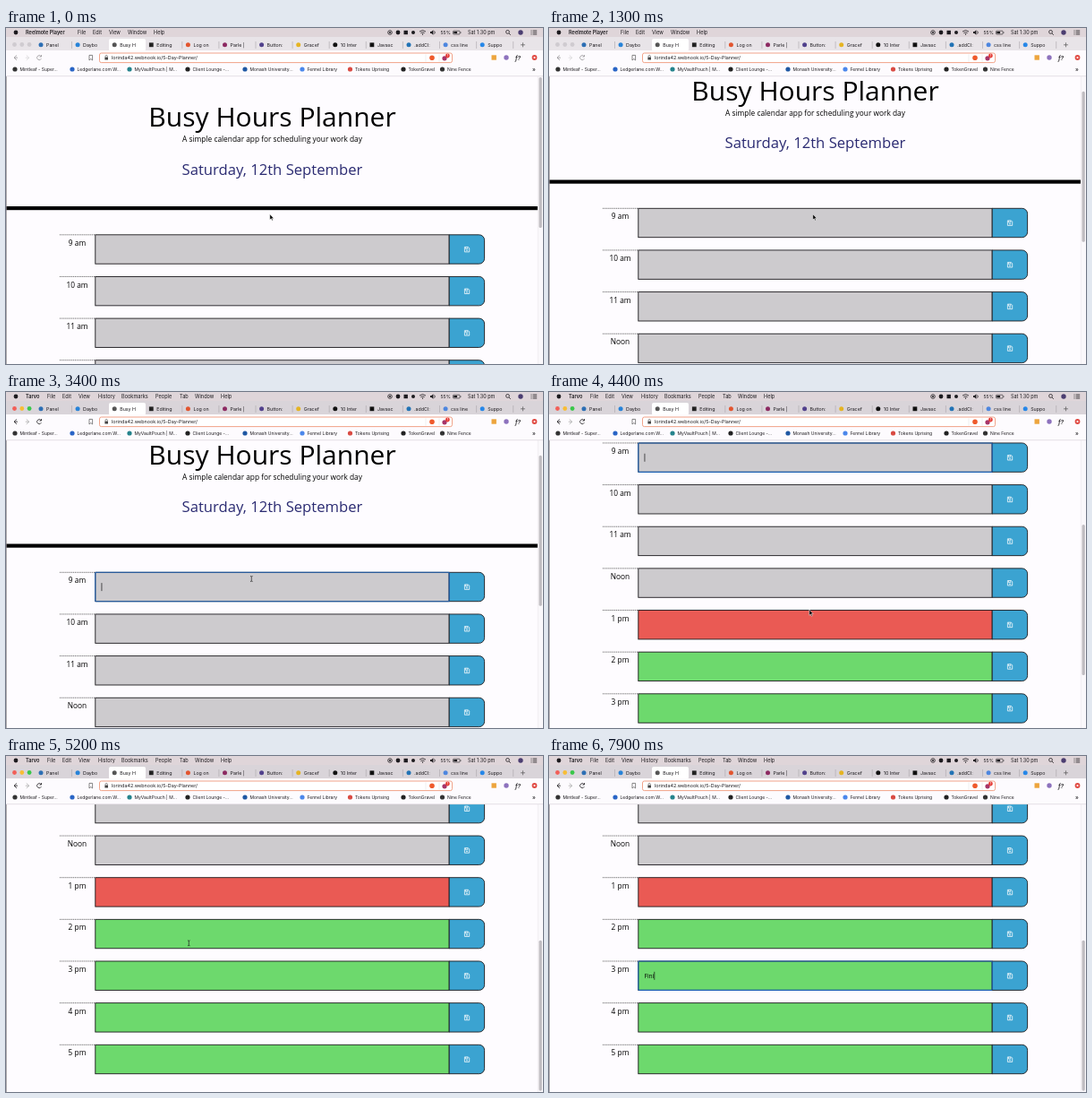
Recreate the animation shown at these times as an HTML page. Size 600x375 px, loop 8 s.

```html
<!DOCTYPE html>
<html lang="en">
<head>
<meta charset="utf-8">
<title>Day planner</title>
<style>
  html, body { margin: 0; height: 100%; overflow: hidden; background: #fefcff; }
  svg { display: block; width: 600px; height: 375px; }
  text { font-family: Inter, "Liberation Sans", sans-serif; white-space: pre; }
  #page text { font-family: "Open Sans", "Noto Sans", sans-serif; }
</style>
</head>
<body>
<svg id="stage" viewBox="0 0 600 375"></svg>
<script>
const LOOP = 8000, STEP = 100;
const ROW_TOP = 230.6, ROW_GAP = 46.65;
const FIRST_CLICK = 2400, SECOND_CLICK = 6000;
const INK = '#1c1a1e';

const rect = (x, y, w, h, fill, extra = '') =>
  `<rect x="${x}" y="${y}" width="${w}" height="${h}" fill="${fill}" ${extra}/>`;
const dot = (x, y, r, fill, extra = '') =>
  `<circle cx="${x}" cy="${y}" r="${r}" fill="${fill}" ${extra}/>`;
const line = (d, color = INK, width = 0.8, extra = '') =>
  `<path d="${d}" fill="none" stroke="${color}" stroke-width="${width}" ${extra}/>`;
const text = (x, y, size, str, fill = INK, extra = '') =>
  `<text x="${x}" y="${y}" font-size="${size}" fill="${fill}" ${extra}>${str}</text>`;
const centered = (x, y, size, str, fill) => text(x, y, size, str, fill, 'text-anchor="middle"');
const group = (id, body) => `<g id="${id}">${body}</g>`;
const rowY = i => ROW_TOP + i * ROW_GAP;

function hourRow(label, i) {
  const fill = i < 4 ? '#cdcbce' : i === 4 ? '#ea5a54' : '#6dd96d';
  return `<g transform="translate(0 ${rowY(i)})">` +
    line('M60 .2H99', '#444', 0.8, 'stroke-dasharray="1.2 .9"') +
    centered(79.5, 12.3, 8.33, label, '#000') +
    rect(99.8, 0.2, 395.4, 32.4, fill, `stroke="${INK}" stroke-width=".9"`) +
    `<path d="M495.2 .2H528.6a6 6 0 0 1 6 6V26.6a6 6 0 0 1-6 6H495.2Z" fill="#3ba3d1" stroke="${INK}" stroke-width=".9"/>` +
    line('M512.4 13.8h4l1.3 1.3v4.2h-5.3zM513.6 14v1.9h2.2v-1.9', '#fff', 0.75) +
    dot(515, 17.7, 0.8, '#fff') + '</g>';
}

function page() {
  const hours = ['9 am', '10 am', '11 am', 'Noon', '1 pm', '2 pm', '3 pm', '4 pm', '5 pm'];
  return centered(297.5, 110, 30, 'Busy Hours Planner', '#000') +
    centered(297.5, 127.3, 8.33, 'A simple calendar app for scheduling your work day', '#000') +
    centered(297.5, 163.6, 16.67, 'Saturday, 12th September', '#2b2b72') +
    rect(0, 199, 594, 4.2, '#000') +
    hours.map(hourRow).join('') +
    group('focus',
      rect(99.8, 0.2, 395.4, 32.4, 'none', 'rx=".8" stroke="#1f62b4" stroke-width="1.1"') +
      text(106.5, 19, 6.67, '', '#000', 'id="typed"') +
      rect(106.6, 12, 0.7, 9, '#111', 'id="caret"'));
}

const menu = items => items.map(([x, str], i) =>
  text(x, 7, 5.6, str, INK, i ? '' : 'font-weight="600"')).join('');

function menuBar() {
  return rect(0, 0, 600, 10, '#dfd5d9') + dot(11, 5, 2.4, INK) +
    group('idleMenu', menu([[22, 'Reelmote Player'], [80, 'File'], [97, 'Edit'], [115, 'View'],
      [136, 'Window'], [165, 'Help']])) +
    group('liveMenu', menu([[22, 'Tarvo'], [46, 'File'], [63, 'Edit'], [81, 'View'], [103, 'History'],
      [129, 'Bookmarks'], [167, 'People'], [194, 'Tab'], [211, 'Window'], [240, 'Help']])) +
    dot(429, 5, 2.3, 'none', `stroke="${INK}" stroke-width=".8"`) + dot(429, 5, 1, INK) +
    dot(438, 5, 2.4, INK) + rect(444.5, 2.8, 4.4, 4.4, INK) +
    dot(455, 5, 2, INK) +
    line('M462 4q3.5-2.8 7 0M463.4 5.6q2.1-1.6 4.2 0') + dot(465.5, 7, 0.7, INK) +
    `<path d="M474 4h1.4l2-1.7v5.4l-2-1.7H474Z" fill="${INK}"/>` + line('M478.6 3.4q1.4 1.6 0 3.2') +
    text(485.5, 7, 5.2, '55%') +
    rect(499.5, 3.2, 7.6, 3.8, 'none', `rx=".8" stroke="${INK}" stroke-width=".6"`) +
    rect(500.3, 4, 3.8, 2.2, INK) + rect(507.7, 4.3, 0.6, 1.6, INK) +
    text(516, 7, 5.5, 'Sat 1:30 pm') +
    dot(560.5, 4.4, 1.9, 'none', `stroke="${INK}" stroke-width=".8"`) + line('M562 6l1.8 1.8') +
    dot(575, 5, 2.7, '#4b3d70') +
    line('M586.5 3h1M588.6 3h4.6M586.5 5h1M588.6 5h4.6M586.5 7h1M588.6 7h4.6');
}

function tabBar() {
  const tabs = [['Panel', '#2d6fb4'], ['Daybo', '#2783d8'], ['Busy H', '#555'], ['Editing', '#222'],
    ['Log on', '#e2552f'], ['Parle |', '#8c2961'], ['Button:', '#51418c'], ['Gracef', '#e5b423'],
    ['10 Inter', '#111'], ['Javasc', '#111'], ['.addCl:', '#2273b5'], ['css line', '#4d86df'],
    ['Suppo', '#2687e8']];
  return rect(0, 10, 600, 15.5, '#d9d4d9', 'id="strip"') +
    ['#f25f58', '#f8bd35', '#3ac74b'].map((c, i) => dot(9.5 + i * 8.3, 18.5, 2.4, c, 'class="light"')).join('') +
    rect(115, 12, 41, 14, '#fff', 'rx="2"') +
    tabs.map(([name, color], i) => {
      const x = 39 + i * 41.1;
      const mark = i === 3 || i === 9 ? rect(x - 2.4, 16.4, 4.8, 4.8, color) : dot(x, 18.8, 2.5, color);
      const edge = i === 1 || i === 2 ? '' : line(`M${x + 34.5} 15v8`, '#aaa4aa', 0.6);
      return mark + text(x + 6, 20.8, 5.3, name) + edge;
    }).join('') +
    line('M575 18.8h5M577.5 16.3v5', '#555', 0.7);
}

function toolBar() {
  return rect(0, 25, 600, 29, '#fdfbfe') +
    group('tools', line('M12 30.5l-3 2.7 3 2.7M9 33.2h4') +
      line('M22.8 30.5l3 2.7-3 2.7M21.8 33.2h4', '#aaa') +
      line('M39.2 31.7a2.5 2.5 0 1 0 .2 2.5M39.5 30v2h-2')) +
    line('M93 30.4h3.6v5.6l-1.8-1.5-1.8 1.5z', '#555', 0.7) +
    rect(104.5, 28, 394, 10.6, '#fff', 'rx="2" stroke="#ee8d6d" stroke-width=".8"') +
    rect(110.4, 32.6, 3.6, 2.9, '#444') + line('M111 32.6v-.9a1.2 1.2 0 0 1 2.4 0v.9', '#444', 0.6) +
    text(118, 35.2, 5.4, 'lorinda42.webnook.io/5-Day-Planner/') +
    line('M469 29.5v8M484 29.5v8', '#ddd', 0.5) +
    dot(476, 33.3, 2.8, '#ef5a2c') + dot(490, 33.8, 2.6, '#a63468') +
    dot(493.4, 31, 2.4, '#e53b35') + centered(493.4, 32.4, 3.8, '1', '#fff') +
    rect(542.5, 30.3, 5.4, 5.4, '#eda53d') + dot(559, 33, 2.7, '#8d72bd') +
    text(569, 35.5, 6.5, 'f?', INK, 'font-style="italic" font-weight="600"') +
    dot(590.5, 33, 2.9, '#e04a43') + dot(590.5, 33, 1.1, '#fff');
}

function bookmarks() {
  const links = [[10, '#333', 'Mintleaf - Super...'], [74, '#2965c6', 'Ledgerlane.com W...'],
    [138, '#25838c', 'MyVaultPouch | M...'], [203, '#222', 'Client Lounge -...'],
    [267, '#1f58a3', 'Monash University...'], [331, '#4b87eb', 'Fennel Library'],
    [384.5, '#d94b43', 'Tokens Uprising'], [444, '#222', 'TokenGravel'], [487.5, '#333', 'Nine Fence']];
  return links.map(([x, color, name]) => dot(x, 46, 2.6, color) + text(x + 5.5, 47.9, 5, name)).join('') +
    text(588, 48, 6.5, '»') + line('M0 53.7H600', '#d3ced4', 0.6);
}

const $ = id => document.getElementById(id);
$('stage').innerHTML = rect(0, 0, 600, 375, '#fefcff') + group('page', page()) +
  rect(594, 54, 6, 321, '#faf8fb') + line('M594.3 54V375', '#e6e3e7', 0.5) +
  rect(595.5, 55, 3.3, 168, '#bfbcc1', 'id="thumb" rx="1.6"') +
  line('M.4 10V375', '#8f898f', 0.8) +
  menuBar() + tabBar() + toolBar() + bookmarks() +
  group('cursor',
    '<path id="arrow" d="M0 0V6.2L1.5 5 2.5 7.2 3.5 6.8 2.5 4.6H4.4Z" fill="#000" stroke="#fff" stroke-width=".5"/>' +
    line('M-1.3-3q1.3 0 1.3 .8V2.2q0 .8-1.3 .8M1.3-3q-1.3 0-1.3 .8M1.3 3q-1.3 0-1.3-.8', '#222', 0.7, 'id="beam"'));

// Keys are [time, value, ...]; values run linearly between neighbours.
function track(keys, t, k = 1) {
  const i = keys.findIndex(key => key[0] > t);
  if (i < 0) return keys[keys.length - 1][k];
  const a = keys[i - 1], b = keys[i];
  return a[k] + (b[k] - a[k]) * (t - a[0]) / (b[0] - a[0]);
}
const scrollKeys = [[0, 0], [300, 0], [800, 22], [1200, 29.5], [3700, 29.5], [4500, 194.5], [5000, 281.7]];
const cursorKeys = [[0, 294.8, 207.8], [1700, 294.8, 207.8], [2300, 274.3, 208.5], [3600, 274.3, 208.5],
  [4000, 290.8, 243], [4600, 290.8, 243], [5200, 204.3, 208.8], [5400, 204.3, 208.8], [5900, 190, 243]];
const keyTimes = [7500, 7600, 7800, 7900];

const show = (id, on) => $(id).setAttribute('display', on ? 'inline' : 'none');
const move = (id, x, y) => $(id).setAttribute('transform', `translate(${x} ${y})`);

function draw(t) {
  const scroll = track(scrollKeys, t);
  const live = t >= FIRST_CLICK, second = t >= SECOND_CLICK;
  move('page', 0, -scroll);
  $('thumb').setAttribute('y', 55 + scroll * 0.535);

  show('idleMenu', !live);
  show('liveMenu', live);
  $('tools').setAttribute('opacity', live ? 1 : 0.45);
  $('strip').setAttribute('fill', live ? '#d9d4d9' : '#e8e4e8');
  document.querySelectorAll('.light').forEach(c => c.style.fill = live ? '' : '#cfcbd0');

  const count = keyTimes.filter(k => k <= t).length;
  const since = t - (second ? SECOND_CLICK : FIRST_CLICK);
  show('focus', live);
  move('focus', 0, rowY(second ? 6 : 0));
  $('typed').textContent = 'Fini'.slice(0, count);
  $('caret').setAttribute('x', 106.6 + (count ? $('typed').getComputedTextLength() : 0));
  show('caret', count || since % 1000 < 500);

  const beam = live && t < 3700 || t >= 5100;
  show('cursor', t < keyTimes[0]);
  show('arrow', !beam);
  show('beam', beam);
  move('cursor', track(cursorKeys, t), track(cursorKeys, t, 2));
}

function tick() {
  draw(Math.floor(performance.now() % LOOP / STEP) * STEP);
  requestAnimationFrame(tick);
}
tick();
</script>
</body>
</html>
```
